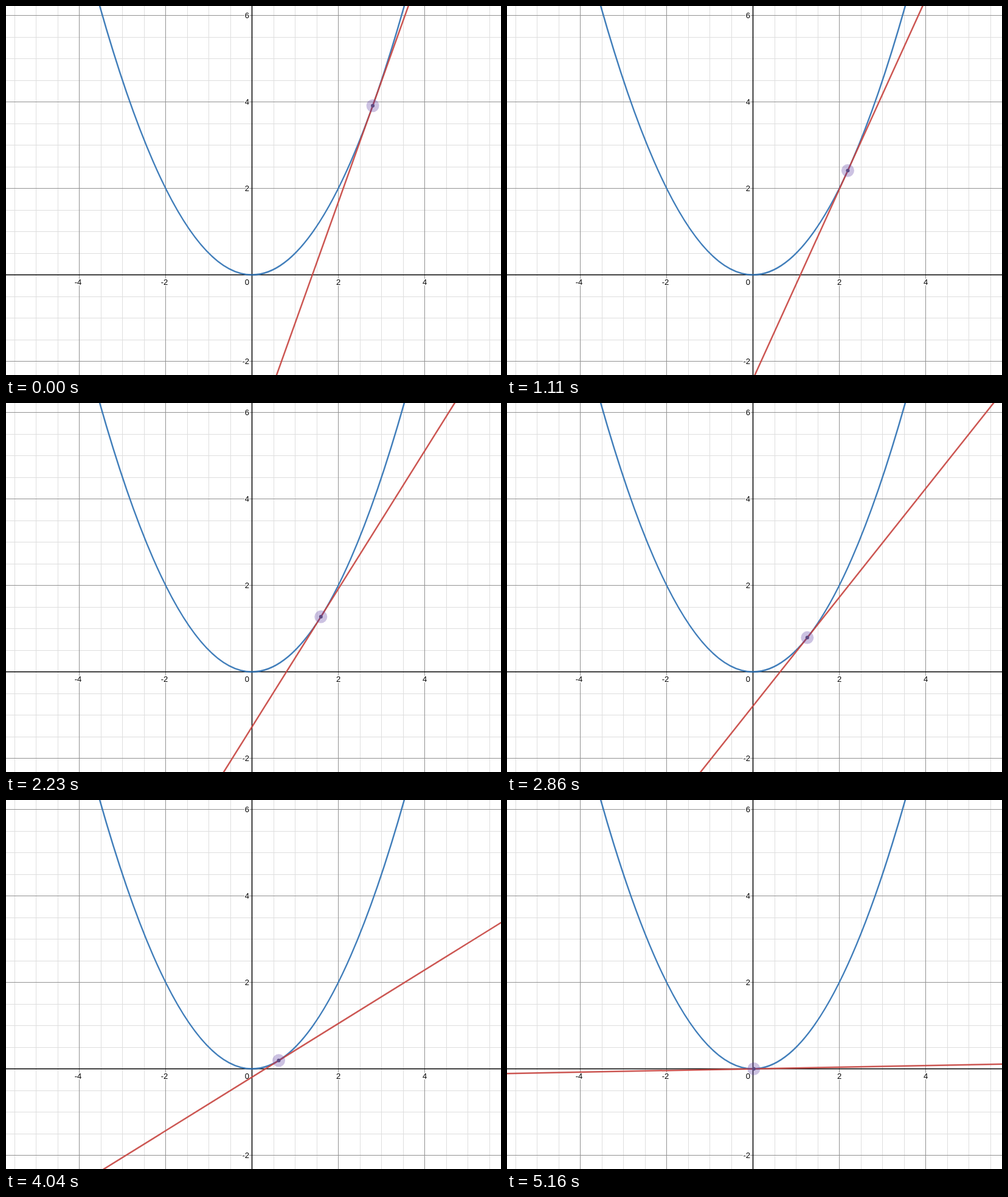
An HTML page that plays this animation: 814 by 606 pixels, repeating every 5290 ms.

```html
<!DOCTYPE html>
<html lang="en">
<head>
<meta charset="utf-8">
<title>Tangent to a parabola</title>
<style>
  html, body { margin: 0; width: 100%; height: 100%; overflow: hidden; background: #fff; }
  svg { display: block; width: 814px; height: 606px; }
  .minor { stroke: #dedede; }
  .major { stroke: #929292; }
  .axis { stroke: #000; stroke-width: 1.5; }
  text {
    font: 13px "Liberation Sans", Arial, sans-serif;
    fill: #000; stroke: #fff; stroke-width: 3px; stroke-linejoin: round; paint-order: stroke;
  }
  .curve { fill: none; stroke-width: 2.5; opacity: .9; }
</style>
</head>
<body>
<svg id="plot" viewBox="0 0 814 606"></svg>
<script>
const W = 814, H = 606, UNIT = 71, OX = 404.5, OY = 441.5;
const LOOP = 5290, STEPS = 74, START = 2.797, STRIDE = 0.03754;
const plot = document.getElementById('plot');
const px = x => OX + x * UNIT;
const py = y => OY - y * UNIT;
const snap = v => Math.floor(v) + 0.5;

function add(tag, attrs, text) {
  const el = document.createElementNS('http://www.w3.org/2000/svg', tag);
  for (const name in attrs) el.setAttribute(name, attrs[name]);
  if (text !== undefined) el.textContent = text;
  return plot.appendChild(el);
}

const line = (x1, y1, x2, y2, cls) => add('line', { x1, y1, x2, y2, class: cls });
const vertical = (x, cls) => line(snap(px(x)), 0, snap(px(x)), H, cls);
const horizontal = (y, cls) => line(0, snap(py(y)), W, snap(py(y)), cls);

function grid(cls, step, skip) {
  for (let v = -6; v <= 6.5; v += step) {
    if (v % skip === 0) continue;
    vertical(v, cls);
    horizontal(v, cls);
  }
}

grid('minor', 0.5, 2);
grid('major', 2, 100);
vertical(0, 'axis');
horizontal(0, 'axis');

for (const v of [-4, -2, 2, 4])
  add('text', { x: px(v) - (v < 0 ? 2 : 0), y: 458, 'text-anchor': 'middle' }, v);
add('text', { x: 400, y: 458, 'text-anchor': 'end' }, 0);
for (const v of [-2, 2, 4, 6])
  add('text', { x: 400, y: py(v) + 4.5, 'text-anchor': 'end' }, v);

// y = x² / 2 as a single quadratic Bézier
add('path', {
  class: 'curve', stroke: '#2d70b3',
  d: `M${px(-4)} ${py(8)} Q${px(0)} ${py(-8)} ${px(4)} ${py(8)}`
});
const tangent = add('line', { class: 'curve', stroke: '#c74440' });
const halo = add('circle', { r: 10.5, fill: '#6042a6', 'fill-opacity': 0.32 });
const dot = add('circle', { r: 3, fill: '#5f4b82' });

// Steps last 70 ms, with two shorter ones of 60 ms
const stepTime = k => 70 * k - (k >= 5 ? 10 : 0) - (k >= 45 ? 10 : 0);

function stepAt(t) {
  let k = 0;
  while (k < STEPS && t >= stepTime(k + 1)) k++;
  return k;
}

function place(a) {
  const lineY = x => a * x - a * a / 2;
  tangent.setAttribute('x1', px(-6));
  tangent.setAttribute('y1', py(lineY(-6)));
  tangent.setAttribute('x2', px(6));
  tangent.setAttribute('y2', py(lineY(6)));
  for (const c of [halo, dot]) {
    c.setAttribute('cx', px(a));
    c.setAttribute('cy', py(a * a / 2));
  }
}

const began = performance.now();
function draw() {
  const t = (performance.now() - began) % LOOP;
  place(START - STRIDE * stepAt(t));
  requestAnimationFrame(draw);
}
draw();
</script>
</body>
</html>
```
